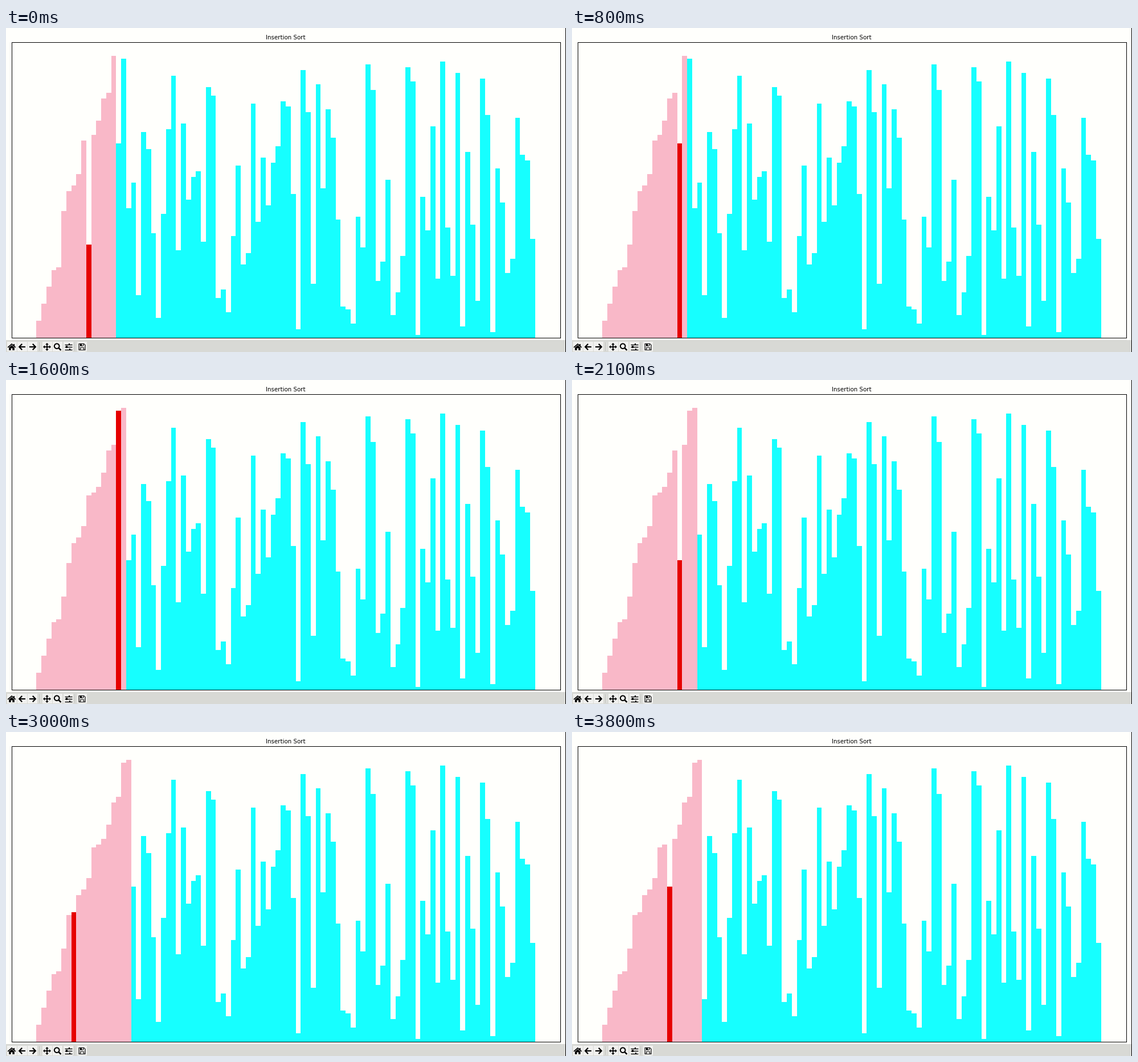
Animation, 983 px wide and 570 px high, one loop 3.9 s. Source, as a matplotlib script:

```python
import matplotlib.pyplot as plt
from matplotlib.animation import FuncAnimation
from matplotlib.patches import Circle, Polygon, Rectangle

W, H, DPI = 983, 570, 100
TICK = 100
PAPER, BAR_GREY, LIGHT = "#fffffc", "#d8d9d5", "#f1f1ef"
PINK, RED, CYAN = "#f9b8c8", "#e60000", "#16ffff"

VALUES = [
    6, 12, 18, 24, 25, 45, 52, 54, 58, 70, 33, 72, 77, 85, 87, 100, 69, 99, 46, 55,
    15, 73, 67, 37, 7, 44, 74, 93, 31, 76, 49, 57, 59, 34, 89, 86, 14, 17, 9, 36,
    61, 26, 30, 83, 41, 64, 47, 62, 68, 84, 82, 51, 3, 95, 80, 19, 90, 53, 81, 71,
    42, 11, 10, 5, 43, 32, 97, 88, 20, 27, 56, 8, 16, 29, 96, 91, 1, 50, 38, 75,
    21, 98, 39, 22, 94, 4, 66, 40, 13, 92, 79, 2, 60, 48, 23, 28, 78, 65, 63, 35,
]
FIRST_POS, FIRST_END, LAST_END = 10, 15, 19

# (first step, last step, ticks the last step stays on screen)
RUNS = [(0, 0, 2), (2, 5, 3), (7, 12, 2), (13, 16, 2), (17, 24, 3), (26, 27, 2), (28, 33, 1)]


def insertion_steps(values):
    """Yield (values, active index, end of sorted part) after every swap."""
    a = list(values)
    for end in range(FIRST_END, LAST_END + 1):
        j = FIRST_POS if end == FIRST_END else end
        yield a[:], j, end
        while j > 0 and a[j - 1] > a[j]:
            a[j - 1], a[j] = a[j], a[j - 1]
            j -= 1
            yield a[:], j, end


steps = list(insertion_steps(VALUES))
schedule = []
for first, last, hold in RUNS:
    schedule += list(range(first, last)) + [last] * hold


def px(pixels):
    return pixels * 72 / DPI


fig = plt.figure(figsize=(W / DPI, H / DPI), dpi=DPI, facecolor=PAPER)

# Window chrome in pixel coordinates, y pointing down
ui = fig.add_axes([0, 0, 1, 1])
ui.set(xlim=(0, W), ylim=(H, 0))
ui.axis("off")


def box(x, y, w, h, color):
    ui.add_patch(Rectangle((x, y), w, h, fc=color, lw=0))


def shape(points, color="black"):
    ui.add_patch(Polygon(points, fc=color, lw=0))


def stroke(points, width):
    xs, ys = zip(*points)
    ui.plot(xs, ys, color="black", lw=px(width), solid_capstyle="butt", solid_joinstyle="miter")


def home(x, y):
    stroke([(x - 6.8, y + 1), (x, y - 5), (x + 6.8, y + 1)], 1.7)
    box(x + 3.4, y - 5, 1.8, 3.5, "black")
    shape([(x - 4.8, y + 1.2), (x, y - 3), (x + 4.8, y + 1.2), (x + 4.8, y + 6),
           (x + 1.4, y + 6), (x + 1.4, y + 2.4), (x - 1.4, y + 2.4), (x - 1.4, y + 6),
           (x - 4.8, y + 6)])


def arrow(x, y, side):
    stroke([(x - 5.5 * side, y), (x + 5 * side, y)], 2.2)
    stroke([(x + 0.3 * side, y - 5.2), (x + 5.3 * side, y), (x + 0.3 * side, y + 5.2)], 2.2)


def move(x, y):
    stroke([(x - 5, y), (x + 5, y)], 1.8)
    stroke([(x, y - 5), (x, y + 5)], 1.8)
    for dx, dy in [(1, 0), (-1, 0), (0, 1), (0, -1)]:
        tip = (x + 7 * dx, y + 7 * dy)
        bx, by = x + 4 * dx, y + 4 * dy
        shape([tip, (bx + 2.8 * dy, by + 2.8 * dx), (bx - 2.8 * dy, by - 2.8 * dx)])


def zoom(x, y):
    ui.add_patch(Circle((x - 1.3, y - 1.3), 4.3, fc="none", ec="black", lw=px(2)))
    stroke([(x + 1.8, y + 1.8), (x + 6, y + 6)], 2.5)


def sliders(x, y):
    for dy, knob in [(-4.5, 2), (0, -2.8), (4.5, 2.8)]:
        stroke([(x - 6.5, y + dy), (x + 6.5, y + dy)], 1.4)
        box(x + knob - 1.3, y + dy - 1.7, 2.6, 3.4, "black")


def save(x, y):
    shape([(x - 6, y - 6), (x + 3.5, y - 6), (x + 6, y - 3.5), (x + 6, y + 6), (x - 6, y + 6)])
    shape([(x - 4.8, y - 4.8), (x + 3, y - 4.8), (x + 4.8, y - 3), (x + 4.8, y + 4.8),
           (x - 4.8, y + 4.8)], LIGHT)
    box(x - 4, y - 5, 6.5, 4, "black")
    box(x - 0.2, y - 4.6, 1.6, 2.8, LIGHT)
    box(x - 3.6, y + 1, 7.2, 4.5, "black")
    box(x - 2.6, y + 2, 5.2, 3, LIGHT)


box(0, 549, W, 21, BAR_GREY)
for x in (59, 121):
    box(x, 553, 1, 15, "#bcbdb9")
    box(x + 1, 553, 1, 15, LIGHT)

buttons = [
    (10, home), (28.5, lambda x, y: arrow(x, y, -1)), (46.5, lambda x, y: arrow(x, y, 1)),
    (72, move), (90.5, zoom), (109, sliders), (133.5, save),
]
for x, icon in buttons:
    box(x - 8.5, 552, 17, 17, LIGHT)
    icon(x, 561)
box(982, 0, 1, H, "black")

# Chart
left, right, top, bottom = 9.5, 972.5, 24.5, 544.5
ax = fig.add_axes([left / W, 1 - bottom / H, (right - left) / W, (bottom - top) / H])
ax.set(xlim=(-5.5, 104.5), ylim=(0, 105), xticks=[], yticks=[], facecolor=PAPER)
for spine in ax.spines.values():
    spine.set_linewidth(px(1))
ax.set_title("Insertion Sort", fontsize=px(10.2), pad=px(5), family="DejaVu Sans")
bars = ax.bar(range(len(VALUES)), VALUES, width=1, color=CYAN, linewidth=0)


def draw(tick):
    values, active, end = steps[schedule[tick]]
    for k, (bar, value) in enumerate(zip(bars, values)):
        bar.set_height(value)
        bar.set_facecolor(RED if k == active else PINK if k <= end else CYAN)
    return bars.patches


anim = FuncAnimation(fig, draw, frames=len(schedule), interval=TICK, repeat=True, repeat_delay=0)
plt.show()
```
